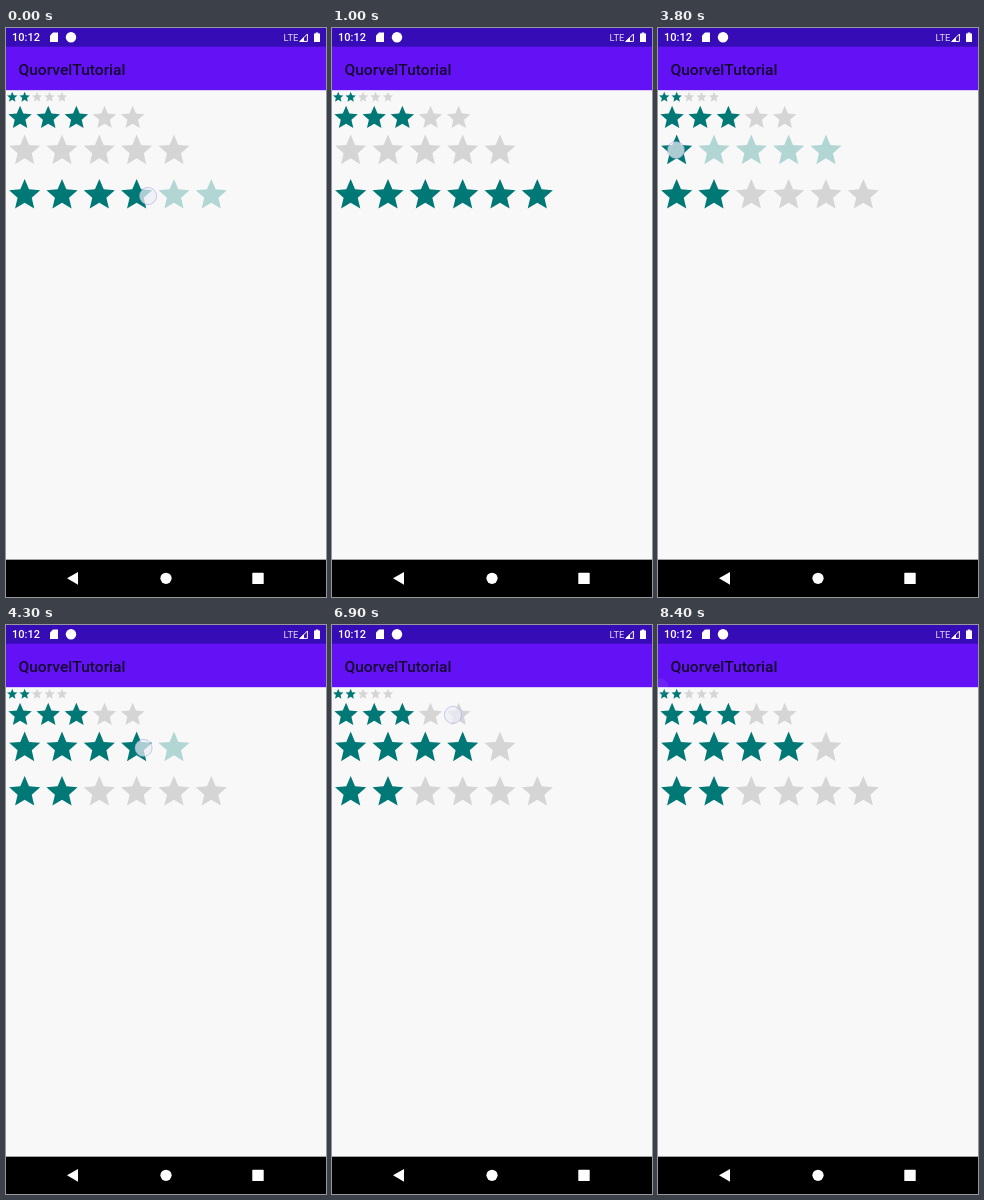
Animation of 320x569 px, one loop 8500 ms. Source, as an HTML page:

```html
<!DOCTYPE html>
<html lang="en">
<head>
<meta charset="utf-8">
<title>Rating bars</title>
<style>
html, body { margin: 0; width: 100%; height: 100%; overflow: hidden; background: #f8f8f8; }
svg { display: block; width: 100vw; height: 100vh; }
text { font-family: Roboto, sans-serif; }
</style>
</head>
<body>
<svg viewBox="0 0 320 569" preserveAspectRatio="none">
  <defs>
    <path id="star" d="M12 17.27 18.18 21 16.54 13.97 22 9.24 14.81 8.63 12 2 9.19 8.63 2 9.24 7.46 13.97 5.82 21Z"/>
  </defs>
  <rect width="320" height="569" fill="#f8f8f8"/>
  <rect y="18" width="320" height="44.2" fill="#6212f5"/>
  <rect width="320" height="18.67" fill="#360cb6"/>
  <text x="12.5" y="46.5" font-size="15.56" font-weight="500" fill="#16052e">QuorvelTutorial</text>

  <g fill="#fff">
    <text x="6" y="13.3" font-size="11" font-weight="500">10:12</text>
    <path d="M47 4.5H52V14H44V7.5Z"/>
    <circle cx="65" cy="9.3" r="5.2"/>
    <text x="277.6" y="12.8" font-size="9.4" fill="#e4def6">LTE</text>
    <path d="M301.4 6V13.4H294Z" fill="none" stroke="#fff"/>
    <path d="M298 9V14H293Z"/>
    <path d="M309.7 4.4H312.3V5.4H314V14H308V5.4H309.7Z"/>
  </g>

  <g id="bars"></g>
  <circle id="touch" r="8.6" fill="#edeff5" fill-opacity=".72" stroke="#8088d8" stroke-opacity=".4"/>

  <rect y="531.66" width="320" height="38" fill="#000"/>
  <g fill="#fff">
    <path d="M61 550.3 72 544V556.7Z"/>
    <circle cx="160" cy="550.3" r="5.6"/>
    <rect x="246.3" y="544.7" width="11.4" height="11.4" rx=".7"/>
  </g>
</svg>
<script>
const LOOP = 8500, TICK = 100, FADE = 300;
const SMALL = 12.44, MEDIUM = 28.15, LARGE = 37.33;
const TEAL = '#007876', GREY = '#d5d5d5', PRESSED = '#b2d6d4';
const SVG = 'http://www.w3.org/2000/svg';
const bars = document.getElementById('bars');
const touch = document.getElementById('touch');

function makeBar(top, cell, count, rating) {
  const stars = Array.from({ length: count }, (_, i) => {
    const star = document.createElementNS(SVG, 'use');
    star.setAttribute('href', '#star');
    star.setAttribute('transform', `translate(${i * cell} ${top}) scale(${cell / 24})`);
    return bars.appendChild(star);
  });
  const paint = (value, press) => {
    const empty = `color-mix(in srgb, ${PRESSED} ${press * 100}%, ${GREY})`;
    stars.forEach((star, i) => { star.style.fill = i < value ? TEAL : empty; });
  };
  paint(rating, 0);
  return { paint, rating };
}

makeBar(62.8, SMALL, 5, 2);
makeBar(75.4, MEDIUM, 5, 3);
const third = makeBar(103.5, LARGE, 5, 0);
const fourth = makeBar(147.9, LARGE, 6, 0);

// A finger lands, slides in a straight line, rests and fades out
const gestures = [
  { start: 0, slide: 500, end: 1000, from: [142, 168], to: [208, 167], bar: fourth },
  { start: 2100, slide: 100, end: 2400, from: [43, 167], to: [43, 167], bar: fourth },
  { start: 3800, slide: 500, end: 4900, from: [18, 122], to: [137.5, 123], bar: third },
  { start: 5900, slide: 300, end: 6300, from: [86, 89], to: [123, 89] },
  { start: 6500, slide: 600, end: 7300, from: [105, 89.5], to: [129, 90] },
  { start: 7700, slide: 600, end: 8500, from: [50, 75], to: [2, 62] }
];

function render(time) {
  const t = Math.floor((time % LOOP) / TICK) * TICK;
  const states = new Map([third, fourth].map(bar => [bar, { value: bar.rating, press: 0 }]));
  let opacity = 0;

  for (const { start, slide, end, from, to, bar } of gestures) {
    if (t < start) break;
    const p = Math.min((t - start) / slide, 1);
    const [x, y] = from.map((v, i) => v + (to[i] - v) * p);
    const press = Math.max(0, Math.min((end - t) / FADE, 1));
    opacity = press ** 2;
    touch.setAttribute('transform', `translate(${x} ${y})`);
    if (bar) states.set(bar, { value: Math.ceil(x / LARGE), press });
  }

  touch.setAttribute('opacity', opacity);
  states.forEach(({ value, press }, bar) => bar.paint(value, press));
}

const begin = performance.now();
function frame() {
  render(performance.now() - begin);
  requestAnimationFrame(frame);
}
frame();
</script>
</body>
</html>
```
